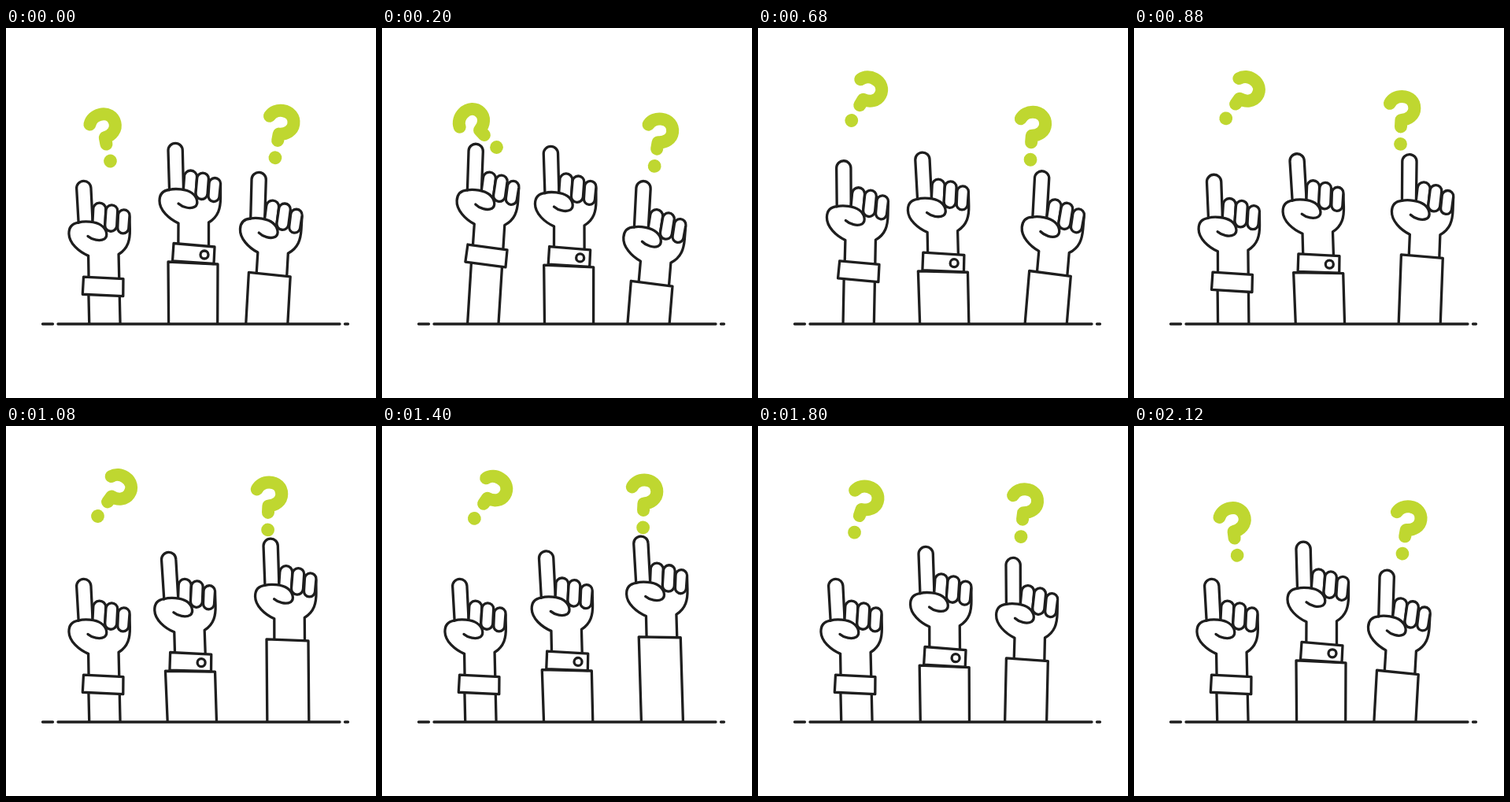
Recreate the animation shown at these times as an HTML page. Size 470 px wide and 470 px high, loop 2.16 s.

```html
<!DOCTYPE html>
<html>
<head>
<meta charset="utf-8">
<style>
html, body { margin: 0; width: 100%; height: 100%; overflow: hidden; background: #fff; }
svg { display: block; width: 100vw; height: 100vh; }
.ink { fill: #fff; stroke: #1e1e1e; stroke-width: 3.3; stroke-linecap: round; stroke-linejoin: round; }
.mark { fill: none; stroke: #bfd730; stroke-width: 16; stroke-linecap: round; stroke-linejoin: round; }
</style>
</head>
<body>
<svg viewBox="0 0 470 470">
  <defs>
    <clipPath id="above"><path d="M0 0H470V376H0Z"/></clipPath>
    <g id="mark" class="mark">
      <path d="M-14-51.5C-11-57.5-5-60.5 1.5-60.5C11-60.5 17.5-54 17.5-45.5C17.5-37 10-31 .7-30.5L.3-22"/>
      <circle r="8.4" fill="#bfd730" stroke="none"/>
    </g>
    <path id="palm" d="M3.8 126L4 92.5C-8 87-20 76-20 64C-20 56-16 51-7.5 50L30 40L57.5 44V60C57.5 73 55 84 42.5 91.5V128"/>
    <g id="fist">
      <path d="M10.3 50L11.5 33.5A8 8 0 0 1 27.5 33.5L26 57"/>
      <path d="M27.6 36A7.4 7.4 0 0 1 42.4 36L41 55A7.5 7.5 0 0 1 26 54Z"/>
      <path d="M43 42.3A7.3 7.3 0 0 1 57.6 42.3L56 58.5A7 7 0 0 1 42 57.5Z"/>
      <path d="M-7.5 50C0 48 14 49 21 54C28 59 30 68 25 71.5C19 75 9 72 4 67.5"/>
    </g>
  </defs>
  <g id="marks"></g>
  <g id="arms" class="ink" clip-path="url(#above)"></g>
  <path class="ink" d="M46.5 376H59.5M66 376H424M430.5 376H434.5"/>
</svg>
<script>
const LOOP = 2160, STEP = 40;

const ease = u => (1 - Math.cos(Math.PI * u)) / 2;
const mix = (a, b, u) => a + (b - a) * u;
const blend = (p, q, u) => p.map((a, i) => mix(a, q[i], u));

// Cyclic sine easing between turning points [time, value]
function swing(t, ...turns) {
  const i = turns.findLastIndex(p => p[0] <= t);
  const a = turns.at(i), b = turns[(i + 1) % turns.length];
  const since = from => (t - from + LOOP) % LOOP;
  const span = (b[0] - a[0] + LOOP) % LOOP;
  return mix(a[1], b[1], ease(since(a[0]) / span));
}

// Each pose is [x, y, angle, drop of the index finger]
function leftArm(t) {
  const lift = swing(t, [0, 0], [240, 1], [1080, 0]);
  return [...blend([98.5, 197, -1.3], [120.5, 153.5, 3.9], lift), 6.5 * (1 - lift) ** 3];
}

function middleArm(t) {
  const lean = swing(t, [0, 0], [1040, 1]);
  return [215 - 8.5 * lean, 155.5 + 14 * Math.sin(Math.PI * t / LOOP), -2 * lean, 0];
}

function rightArm(t) {
  return [
    swing(t, [0, 321], [580, 362], [1300, 329]),
    swing(t, [0, 192.5], [340, 210], [1260, 146.5]),
    swing(t, [0, 3.2], [420, 6.3], [1320, -1.8]),
    0
  ];
}

// Knocked by the finger, thrown up, then falling back
function leftMark(t) {
  const rest = [132.5, 169, -14], hit = [145.5, 151.5, -46], top = [116.5, 114.5, 34];
  if (t < 200) return blend(rest, hit, t / 200);
  if (t < 1080) return blend(top, hit, (1 - (t - 200) / 880) ** 3.2);
  return blend(top, rest, ((t - 1080) / 1080) ** 2.4);
}

function rightMark(t) {
  return [
    swing(t, [500, 349], [1160, 332], [1520, 331.5]),
    swing(t, [420, 180], [1200, 129], [1440, 129]),
    swing(t, [0, 7.7], [1000, .2], [1360, .2])
  ];
}

function add(parent, html) {
  const g = document.createElementNS('http://www.w3.org/2000/svg', 'g');
  g.innerHTML = html;
  return document.getElementById(parent).appendChild(g);
}

function place(el, [x, y, angle]) {
  el.setAttribute('transform', `translate(${x} ${y}) rotate(${angle})`);
}

function addArm(pose, sleeve) {
  const el = add('arms', `<use href="#palm"/>${sleeve}<path class="index"/><use href="#fist"/>`);
  const index = el.querySelector('.index');
  return t => {
    const p = pose(t), drop = p[3];
    place(el, p);
    index.setAttribute('d', `M-7.5 50L-9 ${drop}A9.15 9.15 0 0 1 9.3 ${drop}L10.5 50`);
  };
}

function addMark(pose) {
  const el = add('marks', '<use href="#mark"/>');
  return t => place(el, pose(t));
}

const parts = [
  addMark(leftMark),
  addMark(rightMark),
  addArm(leftArm, '<path d="M3.2 140V270H42.5V140"/><path d="M-2.7 119L47.7 122.7L47 144.8L-4.4 141.2Z"/>'),
  addArm(middleArm, `<path d="M-9 141.5L54 144.5L53.5 270H-8Z"/>
    <path d="M-2 118L50 122.5L49 144L-3.5 140.5Z"/><circle cx="37" cy="132.5" r="5"/>`),
  addArm(rightArm, '<path d="M-6 118.5L47 121V270H-6Z"/>')
];

const start = performance.now();
function tick() {
  const t = Math.floor((performance.now() - start) % LOOP / STEP) * STEP;
  parts.forEach(draw => draw(t));
  requestAnimationFrame(tick);
}
tick();
</script>
</body>
</html>
```
